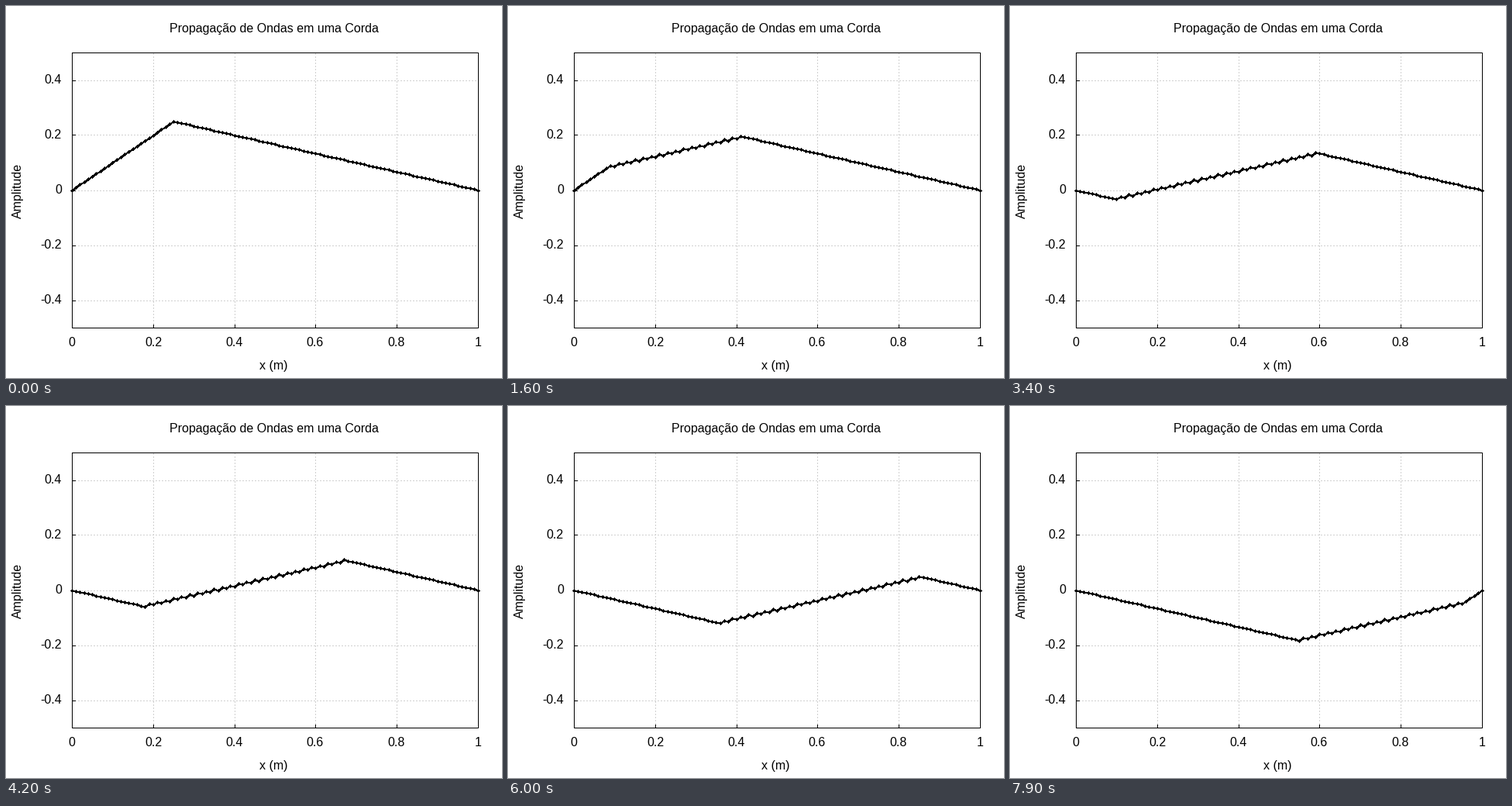
Animation of 640x480 px, one loop 8000 ms. Source, as a matplotlib script:

```python
import numpy as np
import matplotlib.pyplot as plt
from matplotlib.animation import FuncAnimation
from matplotlib.collections import PolyCollection

DPI = 100
PX = 72 / DPI  # one pixel in points
LEFT, RIGHT, TOP, BOTTOM = 85, 609, 60, 415
CELLS, FRAMES = 100, 80
PLUCK = 0.25

plt.rcParams["font.family"] = "Liberation Sans"
plt.rcParams["path.simplify"] = False


def to_px(x, y):
    """Data coordinates to the nearest pixel centre."""
    px = LEFT + x * (RIGHT - LEFT)
    py = (TOP + BOTTOM) / 2 - y * (BOTTOM - TOP)
    return np.floor(px + 0.5) + 0.5, np.floor(py + 0.5) + 0.5


def simulate():
    """Plucked string, leapfrog scheme with Courant number 1."""
    x = np.linspace(0, 1, CELLS + 1)
    y = np.where(x <= PLUCK, x, (1 - x) * PLUCK / (1 - PLUCK))
    old, rows = y, [y]
    for _ in range(FRAMES - 1):
        new = np.zeros_like(y)
        new[1:-1] = y[2:] + y[:-2] - old[1:-1]
        old, y = y, new
        rows.append(y)
    return x, rows


fig = plt.figure(figsize=(640 / DPI, 480 / DPI), dpi=DPI, facecolor="white")
ax = fig.add_axes([0, 0, 1, 1])
ax.set(xlim=(0, 640), ylim=(480, 0))
ax.axis("off")


def stroke(xs, ys, **kw):
    style = dict(color="black", lw=PX, snap=False,
                 solid_capstyle="butt", solid_joinstyle="miter")
    return ax.plot(xs, ys, **{**style, **kw})[0]


def label(x, y, text, ha="center", **kw):
    ax.text(x, y, text, fontsize=16 * PX, ha=ha, va="baseline", **kw)


GRID = dict(color="#d0d0d0", dashes=(2, 2), zorder=1)
TICK = 5
L, R, T, B = (v + 0.5 for v in (LEFT, RIGHT, TOP, BOTTOM))

for i in range(6):
    x = to_px(i / 5, 0)[0]
    if 0 < i < 5:
        stroke([x, x], [BOTTOM, TOP], **GRID)
        stroke([x, x], [BOTTOM, BOTTOM - TICK + 1])
    label(x - 0.5, 439, f"{i / 5:g}")

for value, row in zip((0.4, 0.2, 0, -0.2, -0.4), (96, 166, 238, 309, 380)):
    y = row + 0.5
    stroke([LEFT, RIGHT], [y, y], **GRID)
    stroke([LEFT, LEFT + TICK], [y, y])
    mid = (TOP + BOTTOM) / 2 - value * (BOTTOM - TOP)
    label(72, np.floor(mid) + 5, f"{value:g}", ha="right")

stroke([L, R, R, L, L], [T, T, B, B, T], solid_capstyle="projecting")

label(346, 34, "Propagação de Ondas em uma Corda")
label(345, 469, "x (m)")
label(20, 238.5, "Amplitude", rotation=90, rotation_mode="anchor")

# Pixel-stepped diamond, five pixels across
quarter = np.array([(2.5, 0.5), (1.5, 0.5), (1.5, 1.5), (0.5, 1.5), (0.5, 2.5)])
turn = np.array([(0, 1), (-1, 0)])
diamond = np.vstack([quarter @ np.linalg.matrix_power(turn, k)
                     for k in range(4)])

xs, history = simulate()
string = stroke([], [], antialiased=False, zorder=4)
dots = PolyCollection([], facecolors="black", linewidths=0,
                      snap=False, zorder=5)
ax.add_collection(dots, autolim=False)


def update(n):
    px, py = to_px(xs, history[n])
    string.set_data(px, py)
    dots.set_verts(np.column_stack([px, py])[:, None] + diamond)
    return string, dots


anim = FuncAnimation(fig, update, frames=FRAMES, interval=100,
                     repeat=True, repeat_delay=0, blit=False)
plt.show()
```
